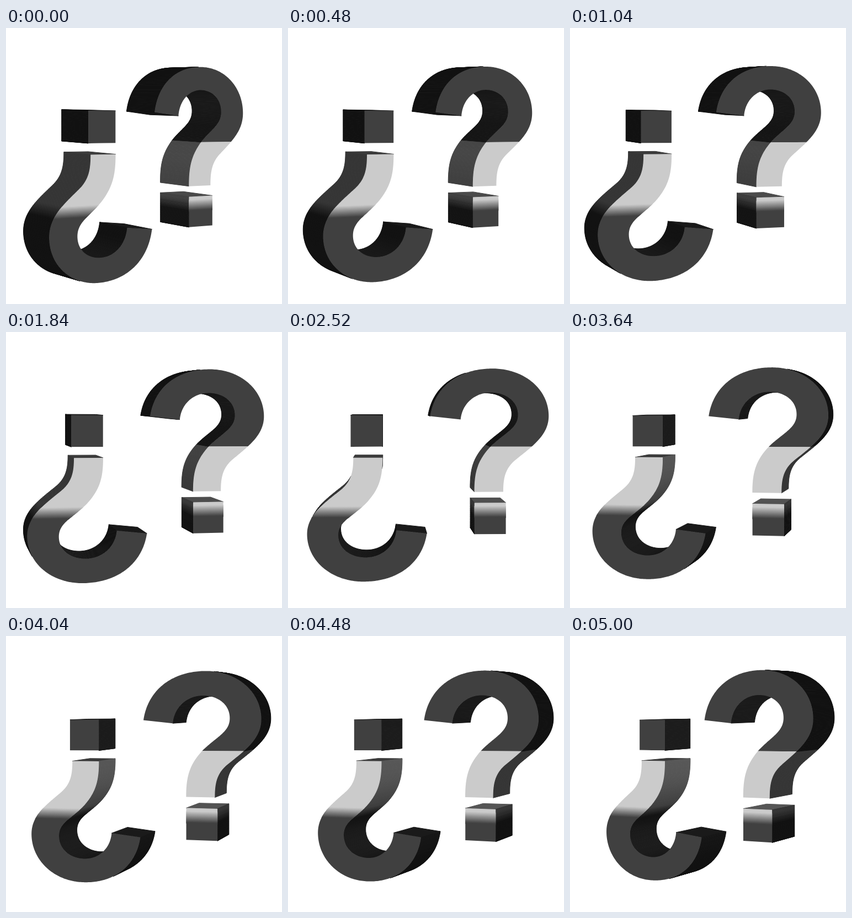
An HTML page with a canvas that plays this animation: 500x500 px, repeating every 5.04 s.

```html
<!DOCTYPE html>
<html lang="en">
<head>
<meta charset="utf-8">
<title>Turning question marks</title>
<style>
  html, body { margin: 0; height: 100%; overflow: hidden; background: #fff; }
  canvas { display: block; width: 100vw; height: 100vh; }
</style>
</head>
<body>
<canvas id="stage" width="500" height="500"></canvas>
<script>
const ctx = document.getElementById('stage').getContext('2d');
const LOOP = 5040, STEP = 40;
const DIST = 1740, FRONT = 23, BACK = -64;
const EDGE = -43, FADE_START = 63, FADE_END = 83;
const DARK = 64, LIGHT = 203;
const LAMP = [90, -60, 90];

// Samples a chain of cubic Béziers: a start point, then x1 y1 x2 y2 x y per piece
function curve(x, y, ...pieces) {
  const points = [[x, y]];
  for (const [x1, y1, x2, y2, x3, y3] of pieces) {
    const n = Math.ceil(Math.hypot(x3 - x, y3 - y) / 2);
    for (let i = 1; i <= n; i++) {
      const t = i / n, u = 1 - t;
      const mix = (a, b, c, d) => u * u * u * a + 3 * u * u * t * b + 3 * u * t * t * c + t * t * t * d;
      points.push([mix(x, x1, x2, x3), mix(y, y1, y2, y3)]);
    }
    [x, y] = [x3, y3];
  }
  return points;
}

const line = (x, y0, y1) => curve(x, y0, [x, y0, x, y1, x, y1]);

const hook = [
  ...curve(5.8, -97.6,
    [14, -151, 58, -183, 118, -183],
    [175, -183, 219, -146, 219, -98],
    [219, -64, 190, -44, 160, -20],
    [140, -4, 137, 14, 137, 38]),
  ...curve(85, 38,
    [85, 4, 90, -18, 115, -44],
    [140, -68, 163.6, -76, 163.6, -100],
    [163.6, -125, 141, -140, 115, -140],
    [86, -140, 63, -120, 60.4, -91.7])
];
const dot = [...line(141.7, 57.5, 113.6), ...line(85.2, 113.6, 57.5)];

const upright = [hook, dot];
const inverted = upright.map(s => s.map(([x, y]) => [5.7 - x, 14.5 - y]));
const shapes = [...inverted, ...upright];

let sin, cos;

const turn = (x, z) => [x * cos + z * sin, z * cos - x * sin];

function project(x, y, z) {
  const [side, depth] = turn(x, z);
  const scale = 1 / (1 - depth / DIST);
  return [250.7 + scale * side,
          250.5 + scale * (y + 0.034 * (z - FRONT) + 0.038 * depth)];
}

function tone(y) {
  if (y < EDGE) return DARK;
  const k = Math.min(1, Math.max(0, (y - FADE_START) / (FADE_END - FADE_START)));
  return LIGHT + (DARK - LIGHT) * k;
}

function grey(v) {
  v = Math.round(v);
  return `rgb(${v},${v},${v})`;
}

function trace(points) {
  ctx.beginPath();
  points.forEach(p => ctx.lineTo(p[0], p[1]));
  ctx.closePath();
}

// Brightness of a side piece from p to q under the lamp
function lighting(p, q) {
  const x = (p[0] + q[0]) / 2, y = (p[1] + q[1]) / 2;
  const length = Math.hypot(q[0] - p[0], q[1] - p[1]);
  const [nx, nz] = turn((q[1] - p[1]) / length, 0);
  const ny = (p[0] - q[0]) / length;
  const [wx, wz] = turn(x, (FRONT + BACK) / 2);
  const ray = [LAMP[0] - wx, LAMP[1] - y, LAMP[2] - wz];
  const incidence = (nx * ray[0] + ny * ray[1] + nz * ray[2]) / Math.hypot(...ray);
  return 0.26 + 0.18 * Math.max(0, incidence);
}

function drawSides(shape) {
  const front = shape.map(([x, y]) => project(x, y, FRONT));
  const back = shape.map(([x, y]) => project(x, y, BACK));
  const quads = [];
  shape.forEach((p, i) => {
    const j = (i + 1) % shape.length, q = shape[j];
    const [a, b, c, d] = [front[i], front[j], back[j], back[i]];
    const facing = (c[0] - a[0]) * (d[1] - b[1]) - (c[1] - a[1]) * (d[0] - b[0]);
    if (facing >= 0) return;
    quads.push({
      points: [a, b, c, d],
      depth: -(p[0] + q[0]) * sin,
      color: grey(lighting(p, q) * tone((p[1] + q[1]) / 2))
    });
  });
  quads.sort((a, b) => a.depth - b.depth);
  ctx.lineWidth = 1;
  ctx.lineJoin = 'round';
  for (const { points, color } of quads) {
    trace(points);
    ctx.fillStyle = ctx.strokeStyle = color;
    ctx.fill();
    ctx.stroke();
  }
}

function band(top, bottom, value) {
  trace([[-260, top], [260, top], [260, bottom], [-260, bottom]]
    .map(([x, y]) => project(x, y, FRONT)));
  ctx.fillStyle = grey(value);
  ctx.fill();
}

function drawFront(shape) {
  ctx.save();
  trace(shape.map(([x, y]) => project(x, y, FRONT)));
  ctx.clip();
  band(-300, EDGE, DARK);
  band(EDGE, FADE_START + 2, LIGHT);
  for (let y = FADE_START; y < FADE_END; y++) band(y, y + 3, tone(y + 0.5));
  band(FADE_END, 300, DARK);
  ctx.restore();
}

function draw(now) {
  const t = Math.floor(now % LOOP / STEP) * STEP / 1000;
  const angle = 0.236 * (2.69 - t);
  sin = Math.sin(angle);
  cos = Math.cos(angle);
  ctx.fillStyle = '#fff';
  ctx.fillRect(0, 0, 500, 500);
  for (const shape of shapes) {
    drawSides(shape);
    drawFront(shape);
  }
}

const start = performance.now();
function tick() {
  draw(performance.now() - start);
  requestAnimationFrame(tick);
}
tick();
</script>
</body>
</html>
```
